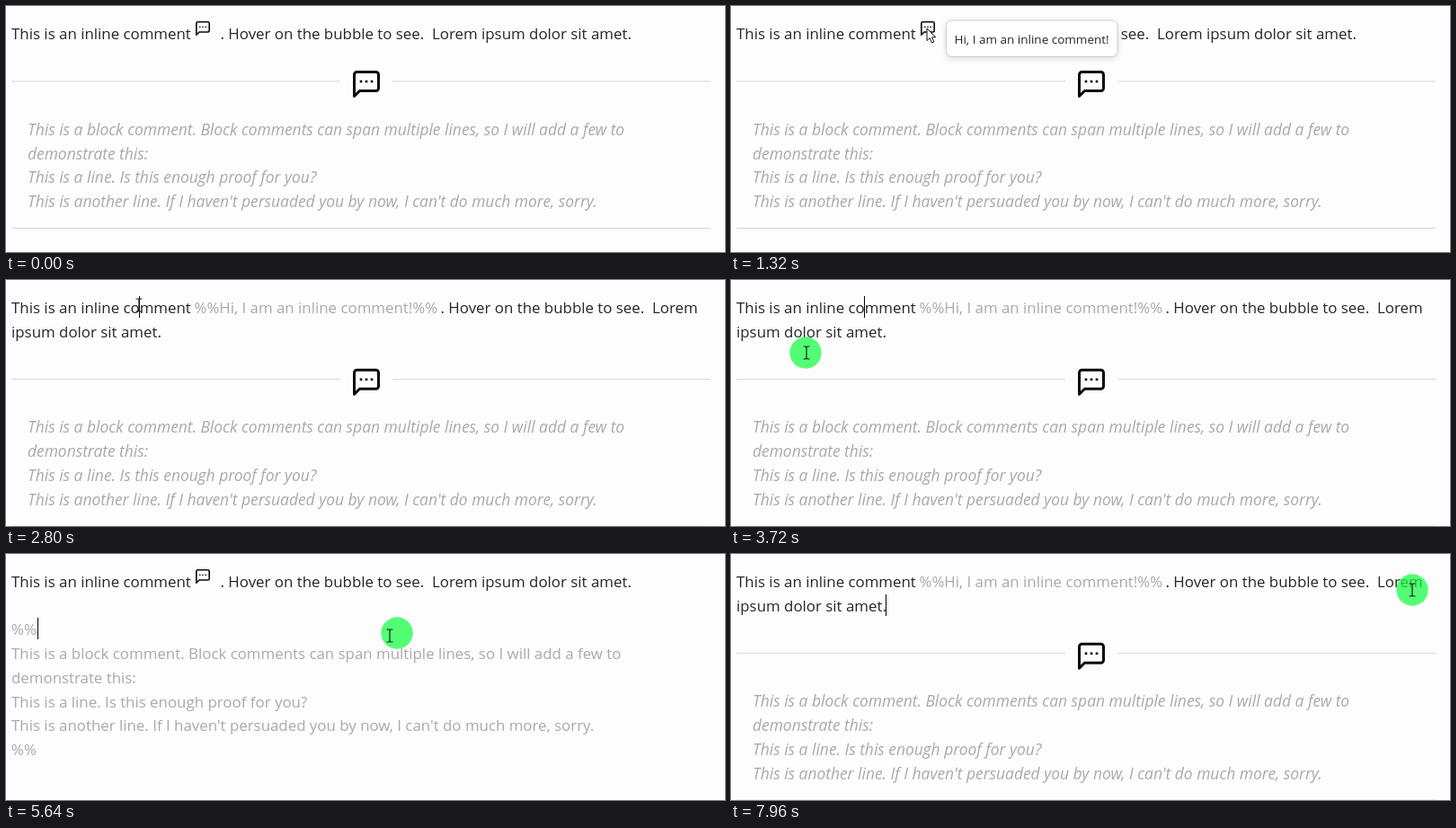
An HTML page that plays this animation: 800 px wide and 274 px high, repeating every 8000 ms.

```html
<!DOCTYPE html>
<html lang="en">
<head>
<meta charset="utf-8">
<title>Comment bubbles</title>
<style>
  html, body { margin: 0; width: 100%; height: 100%; overflow: hidden; background: #fefdfe; }
  svg { display: block; width: 800px; height: 274px; }
  text { font-family: "Open Sans", "Noto Sans", sans-serif; fill: #262626; white-space: pre; }
  .note { fill: #a9a9a9; }
  .slant { font-style: italic; }
  .rule { stroke: #d6d5da; }
  .icon { fill: none; stroke: #0a0a0a; stroke-width: 2; stroke-linecap: round; stroke-linejoin: round; }
  .tip rect { fill: #fff; stroke: #cbcbcf; filter: drop-shadow(0 2px 3px rgba(0, 0, 0, .13)); }
  .tip text { font-size: 13.5px; }
</style>
</head>
<body>
<svg id="stage" viewBox="0 0 800 274">
  <defs>
    <g id="bubble" class="icon">
      <path d="M21 15a2 2 0 0 1-2 2H7l-4 4V5a2 2 0 0 1 2-2h14a2 2 0 0 1 2 2z"/>
      <path d="M8 10h.01M12 10h.01M16 10h.01"/>
    </g>
  </defs>
  <g id="inlineView"></g>
  <g id="inlineEdit"></g>
  <g id="blockView">
    <path class="rule" d="M6 84H372M430 84H784M6 247.5H784"/>
    <use href="#bubble" transform="translate(383 69) scale(1.5)"/>
  </g>
  <g id="blockEdit"></g>
  <path id="caret" stroke="#000" d="M.5 0V24"/>
  <g id="tip" class="tip">
    <rect x="239.5" y="16" width="190.5" height="40.5" rx="6"/>
    <text x="248.5" y="42">Hi, I am an inline comment!</text>
  </g>
  <circle id="press" r="17.7" fill="rgb(12,255,61)" fill-opacity=".7"/>
  <path id="beam" fill="none" stroke="#1c1c1c" stroke-width="1.2" d="M-3.5-7H-1L0-6 1-7H3.5M-3.5 7H-1L0 6 1 7H3.5M0-6V6"/>
  <path id="arrow" fill="#fff" stroke="#111" stroke-linejoin="round" d="M0 0V13.5L3.2 10.6 5.4 16 7.8 15 5.6 9.8H9.8Z"/>
</svg>
<script>
const LOOP = 8000, STEP = 40, LINE = 26.7, BASE = 37;
const $ = id => document.getElementById(id);
const lines = [
  "This is a block comment. Block comments can span multiple lines, so I will add a few to",
  "demonstrate this:",
  "This is a line. Is this enough proof for you?",
  "This is another line. If I haven't persuaded you by now, I can't do much more, sorry."
];

// Font size at which the first block line has its natural width
const pen = document.createElement("canvas").getContext("2d");
function sizeFor(style, width) {
  pen.font = `${style} 100px "Open Sans", "Noto Sans", sans-serif`;
  return 100 * width / pen.measureText(lines[0]).width;
}
const plain = sizeFor("normal", 679), slanted = sizeFor("italic", 665);

function write(parent, x, row, str, cls = "") {
  const el = document.createElementNS("http://www.w3.org/2000/svg", "text");
  el.setAttribute("x", x);
  el.setAttribute("y", BASE + row * LINE);
  el.setAttribute("class", cls);
  el.setAttribute("font-size", cls.includes("slant") ? slanted : plain);
  el.textContent = str;
  $(parent).append(el);
}

const intro = "This is an inline comment", hover = ". Hover on the bubble to see.  Lorem";
write("inlineView", 6, 0, intro);
write("inlineView", 238.5, 0, hover + " ipsum dolor sit amet.");
$("inlineView").insertAdjacentHTML("beforeend",
  '<use href="#bubble" transform="translate(209.4 15.4) scale(.8)"/>');
write("inlineEdit", 6, 0, intro);
write("inlineEdit", 209.5, 0, "%%Hi, I am an inline comment!%%", "note");
write("inlineEdit", 483.5, 0, hover);
write("inlineEdit", 6, 1, "ipsum dolor sit amet.");
lines.forEach((str, i) => {
  write("blockView", 24, i + 4, str, "note slant");
  write("blockEdit", 6, i + 3, str, "note");
});
write("blockEdit", 6, 2, "%%", "note");
write("blockEdit", 6, 7, "%%", "note");

// Editor states: start, edited part, caret x, caret row
const states = [
  { at: 0 },
  { at: 2440, edit: "inline", x: 148, row: 0 },
  { at: 3740, x: 6, row: 1 },
  { at: 5520, edit: "block", x: 35, row: 2 },
  { at: 7840, edit: "inline", x: 172, row: 1 }
];

// Clicks: start, end, x, y
const clicks = [
  [2360, 2760, 148, 28], [3640, 3920, 83, 81], [5440, 5840, 435, 88], [7760, 8000, 758, 40]
];

// Pointer path: time, x, y
const path = [
  [600, 262, -12], [860, 218, 25], [2140, 218, 25], [2340, 148, 28], [2800, 148, 28],
  [3500, 84, 81], [3900, 84, 81], [4640, 433, 91], [5200, 433, 91], [5400, 435, 88],
  [5520, 435, 88], [5640, 427, 91], [5920, 427, 91], [6440, 792, 30], [6700, 758, 40]
];

function pointerAt(t) {
  const i = path.findIndex(p => p[0] > t);
  if (i === 0) return path[0].slice(1);
  if (i < 0) return path[path.length - 1].slice(1);
  const [t0, x0, y0] = path[i - 1], [t1, x1, y1] = path[i];
  const u = (t - t0) / (t1 - t0), k = u * u * (3 - 2 * u);
  return [x0 + (x1 - x0) * k, y0 + (y1 - y0) * k];
}

const show = (id, on) => { $(id).style.display = on ? "" : "none"; };
const move = (id, x, y) => $(id).setAttribute("transform", `translate(${x} ${y})`);

function draw(t) {
  const state = states.findLast(s => s.at <= t);
  show("inlineView", state.edit !== "inline");
  show("inlineEdit", state.edit === "inline");
  show("blockView", state.edit !== "block");
  show("blockEdit", state.edit === "block");
  move("blockView", 0, state.edit === "inline" ? LINE : 0);

  show("caret", state.row !== undefined && (t - state.at) % 1000 < 500);
  if (state.row !== undefined) move("caret", state.x, Math.round(17.8 + state.row * LINE));

  show("tip", t >= 960 && t < 2200);
  const click = clicks.find(c => c[0] <= t && t < c[1]);
  show("press", click);
  if (click) move("press", click[2], click[3]);

  const [x, y] = pointerAt(t), overBubble = t >= 800 && t < 2200;
  show("beam", !overBubble);
  show("arrow", overBubble);
  move(overBubble ? "arrow" : "beam", x, y);
}

const start = performance.now();
function tick() {
  const t = (performance.now() - start) % LOOP;
  draw(Math.floor(t / STEP) * STEP);
  requestAnimationFrame(tick);
}
tick();
</script>
</body>
</html>
```
